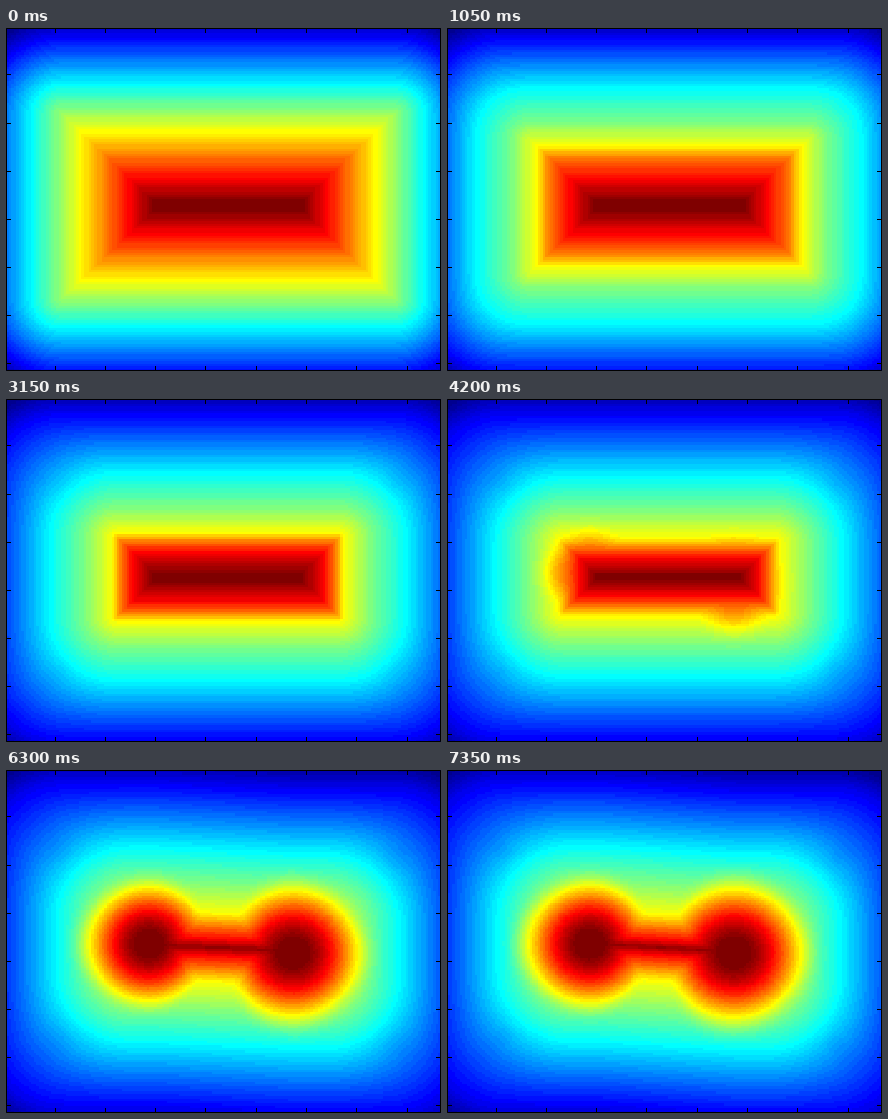
Animation of 435 by 343 pixels, one loop 8 s. Source, as a matplotlib script:

```python
import numpy as np
import matplotlib.pyplot as plt
from matplotlib.animation import FuncAnimation
from matplotlib.colors import ListedColormap
from matplotlib.patches import Rectangle

W, H, DPI = 435, 343, 80
NX, NY = 173, 142
CX, CY, HALF = 222, 178, 70      # spine of the level set, in pixels
DEPTH = 38.2                     # half height of the first rectangle, in cells
STEP_MS, TICK_MS, LOOP_MS = 1050, 50, 8000
PX = 72 / DPI
SEEDS = ((143, 174, 1), (287, 183, 1.1))   # x, y, relative size

cw, ch = W / NX, H / NY
X, Y = np.meshgrid((np.arange(NX) + .5) * cw, (np.arange(NY) + .5) * ch)


def ease(t):
    t = np.clip(t, 0, 1)
    return t * t * (3 - 2 * t)


def decay(start, end, k, tau, power=1):
    return end + (start - end) * np.exp(-(k / tau) ** power)


def box_dist(dx, dy, radius):
    """Square contours up to radius, rounded ones beyond it."""
    inner = np.maximum(dx, dy)
    outer = np.hypot(np.maximum(dx - radius, 0), np.maximum(dy - radius, 0))
    return np.where(inner < radius, inner, radius + outer)


def spine_dist(k):
    """Distance from the spine; far corners keep their first rounding."""
    tilt = .06 * ease((k - 4) / 3)
    dx = np.maximum(abs(X - CX) - HALF, 0) / cw
    dy = abs(Y - CY - tilt * np.clip(X - CX, -HALF, HALF)) / ch
    near = box_dist(dx, dy, decay(DEPTH, 10, k, 2))
    far = box_dist(dx, dy, DEPTH)
    mix = np.clip((far - DEPTH) / 30, 0, 1)
    return near + (far - near) * mix


def spine_value(k):
    """The yellow front closes in while the outer slope flattens."""
    thin = ease((k - 2) / 4.5)
    levels = [1, .875, .75, .625, .5, .375, 0]
    radii = [1.2 - 2 * thin,
             11.1 - 8.1 * thin,
             decay(21, 8, k, 3.8, 2),
             decay(30.9, 12.5, k, 2.6),
             decay(40.9, 26.5, k, 1.8),
             decay(50.8, 41, k, 2.6, 2),
             80.5]
    return np.interp(spine_dist(k), radii, levels)


def soft_max(a, b, w=.05):
    return np.maximum(a, b) + np.maximum(w - abs(a - b), 0) ** 2 / (4 * w)


def field(k):
    v = spine_value(k)
    peak = .65 + .37 * ease((k - 2) / 4)
    for x, y, size in SEEDS:
        d = np.hypot((X - x) / cw, (Y - y) / ch)
        v = soft_max(v, peak * np.exp(-(d / size / (29 + .8 * k)) ** 2))
    v = np.clip(v, 0, 1)
    return (v - v.min()) / (v.max() - v.min())


def jet64():
    v = np.arange(1, 65) / 64
    rgb = [np.clip(1.5 - abs(4 * v - c), 0, 1) for c in (3, 2, 1)]
    return ListedColormap(np.stack(rgb, axis=1))


fields = [field(k) for k in range(8)]

fig = plt.figure(figsize=(W / DPI, H / DPI), dpi=DPI)
ax = fig.add_axes([0, 0, 1, 1])
ax.axis("off")
img = ax.imshow(fields[0], cmap=jet64(), vmin=0, vmax=1, aspect="auto",
                interpolation="nearest", extent=(0, W, H, 0))
ax.set(xlim=(0, W), ylim=(H, 0))

line = dict(color="black", lw=PX, solid_capstyle="butt", snap=False)
for i in range(1, 9):
    x = int((20 * i - .5) * cw) + .5
    ax.plot([x, x], [0, 5], **line)
    ax.plot([x, x], [H - 5, H], **line)
for i in range(7):
    y = int(46.9 + 48.1 * i) + .5
    ax.plot([0, 5], [y, y], **line)
    ax.plot([W - 5, W], [y, y], **line)
ax.add_patch(Rectangle((.5, .5), W - 1, H - 1, fill=False, ec="black",
                       lw=PX, snap=False))


def update(i):
    img.set_data(fields[i * TICK_MS // STEP_MS])
    return [img]


anim = FuncAnimation(fig, update, frames=LOOP_MS // TICK_MS,
                     interval=TICK_MS, repeat=True, repeat_delay=0)
plt.show()
```
